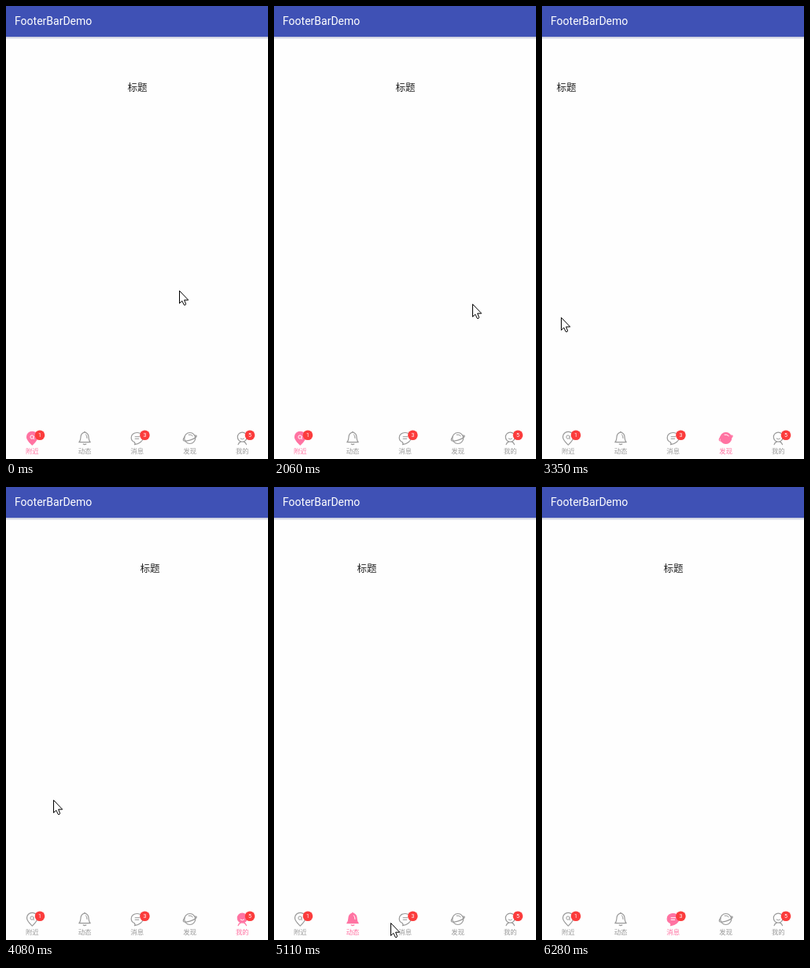
Animation of 333 by 575 pixels, one loop 6.74 s. Source, as an HTML page:

```html
<!DOCTYPE html>
<html lang="zh-CN">
<head>
<meta charset="utf-8">
<title>FooterBarDemo</title>
<style>
html, body { margin: 0; width: 100%; height: 100%; overflow: hidden; background: #fefefe; }
svg { display: block; width: 333px; height: 575px; }
text { font-family: "Noto Sans CJK SC", "Noto Sans CJK", sans-serif; text-anchor: middle; }
.bar { font: 14px Roboto, sans-serif; fill: #fff; text-anchor: start; }
.title { font-size: 12.5px; fill: #222; }
.tab { color: #999; }
.tab.on { color: #ff73a2; }
.tab text { font-size: 8.4px; fill: currentColor; }
.body, .line, .mark { fill: none; stroke: currentColor; stroke-width: 1.2; stroke-linecap: round; stroke-linejoin: round; }
.mark { stroke-width: 1; }
.on .body { fill: currentColor; }
.on .mark { stroke: #fff; }
.badge circle { fill: #fb3c3c; }
.badge text { font: 7px Roboto, sans-serif; fill: #fff; }
</style>
</head>
<body>
<svg viewBox="0 0 333 575">
  <defs>
    <linearGradient id="shade" x2="0" y2="1">
      <stop offset="0" stop-color="#303a80" stop-opacity=".3"/>
      <stop offset="1" stop-color="#303a80" stop-opacity="0"/>
    </linearGradient>
  </defs>
  <rect width="333" height="575" fill="#fefefe"/>
  <rect y="39" width="333" height="3.5" fill="url(#shade)"/>
  <rect width="333" height="39" fill="#3f51b5"/>
  <text class="bar" x="11" y="24">FooterBarDemo</text>

  <g id="pages">
    <text class="title" x="167" y="108">标题</text>
    <text class="title" x="500" y="108">标题</text>
  </g>

  <!-- icons are drawn around the centre of each tab -->
  <g class="tab" transform="translate(33.3 548.5)">
    <path class="body" d="M0 8.6C-3 5.6-6.8 2.2-6.8-1.6A6.8 6.6 0 0 1 6.8-1.6C6.8 2.2 3 5.6 0 8.6Z"/>
    <circle class="mark" cx="-.2" cy="-1.4" r="2.2"/>
    <path class="mark" d="M1.4.2L2.4 1.2"/>
    <text y="19">附近</text>
  </g>
  <g class="tab" transform="translate(100 548.5)">
    <path class="body" d="M-7.2 5.2C-4.8 3.2-5.3 0-4.9-2.4C-4.5-5-2.6-6.8 0-7.6C2.6-6.8 4.5-5 4.9-2.4C5.3 0 4.8 3.2 7.2 5.2Z"/>
    <path class="line" d="M-1.8 7.6Q0 8.8 1.8 7.6M0-8.2V-7.6"/>
    <path class="mark" d="M1.5-4.6Q3-3.2 3 0"/>
    <text y="19">动态</text>
  </g>
  <g class="tab" transform="translate(166.7 548.5)">
    <path class="body" d="M-3.6 5C-6 4-7.5 2-7.5-.6C-7.5-4.4-4.2-7 0-7S7.5-4.4 7.5-.6C7.5 3.6 3 7.2-3.2 8.2C-2.4 7.2-2.6 6-3.6 5Z"/>
    <path class="mark" d="M-2.6-1.8H3M-2.6.8H2"/>
    <text y="19">消息</text>
  </g>
  <g class="tab" transform="translate(233.7 548.5)">
    <circle class="body" r="7"/>
    <path class="line" d="M-6.6-1.6C-8.2.4-8.8 2.4-8 3.2C-5 4.4 5 2 8.3-2C8.8-3.2 8-3.7 6.4-3.2"/>
    <path class="mark" d="M-1.6-4.4Q1.4-5 3.6-2.8"/>
    <text y="19">发现</text>
  </g>
  <g class="tab" transform="translate(300.3 548.5)">
    <circle class="body" cy="-1.4" r="6"/>
    <path class="line" d="M-5.2 8.2Q-4.6 5.6-2 4.6M5.2 8.2Q4.6 5.6 2 4.6"/>
    <path class="mark" d="M-2.2.6Q0 2.6 2.2.6"/>
    <text y="19">我的</text>
  </g>

  <g class="badge" transform="translate(43 544.7)"><circle r="6.3"/><text y="2.4">1</text></g>
  <g class="badge" transform="translate(176.4 544.7)"><circle r="6.3"/><text y="2.4">3</text></g>
  <g class="badge" transform="translate(310 544.7)"><circle r="6.3"/><text y="2.4">5</text></g>

  <path id="cursor" d="M.5.5V16.5L3.8 13.3L6.3 18.5H8L8.6 17.2L6.6 12.2H11.7Z" fill="#fff" stroke="#000"/>
</svg>
<script>
const LOOP = 6740, WIDTH = 333;
const STEP = 72;          // usual time between two refreshes
const PULL = 0.375;       // finger speed in px per ms

// The screen only refreshes during these bursts, in even steps
const bursts = [[0], [520, 580], [950, 1250], [2060, 2740, 3350, 4080, 4720],
  [4870, 5110, 5280], [5500], [5780, 6280]];

// Page changes: released at, new tab, px dragged before, settling time
const moves = [
  { at: 0, tab: 0, drag: 0, settle: 1 },
  { at: 2430, tab: 1, drag: 137, settle: 600 },
  { at: 2869, tab: 2, drag: 61, settle: 500 },
  { at: 3317, tab: 3, drag: 19, settle: 370 },
  { at: 3817, tab: 4, drag: 48, settle: 600 },
  { at: 4929, tab: 1, drag: 0, settle: 400 },
  { at: 5738, tab: 2, drag: 0, settle: 200 }
];

// Cursor way points: time, x, y
const path = [
  [0, 220, 361], [580, 205, 369], [1250, 254, 377], [2060, 252, 378],
  [2400, 102, 397], [2740, 125, 398], [3350, 24, 395], [3720, 110, 396],
  [4080, 60, 397], [4720, 70, 547], [5110, 148, 553], [5280, 157, 553],
  [5500, 167, 553], [6280, 174, 576]
];

const split = (a, b) => {
  const n = Math.max(1, Math.round((b - a) / STEP));
  return Array.from({ length: n }, (_, i) => a + (b - a) * (i + 1) / n);
};
const ticks = bursts.flatMap(([first, ...rest]) =>
  [first, ...rest.flatMap((b, i) => split(i ? rest[i - 1] : first, b))]);
const tickAt = t => ticks.findLastIndex(k => k <= t + 0.01);

const pages = document.getElementById("pages");
const cursor = document.getElementById("cursor");
const tabs = document.querySelectorAll(".tab");

function scrollAt(t) {
  const i = moves.findLastIndex(m => m.at - m.drag / PULL <= t);
  const { at, tab, drag, settle } = moves[i];
  const from = i ? moves[i - 1].tab * WIDTH : 0;
  if (t < at) return from + drag + (t - at) * PULL;
  const left = 1 - Math.min(1, (t - at) / settle);
  const to = tab * WIDTH;
  return to + (from + drag - to) * left ** 5;
}

// Way points are joined evenly over the refreshes, so pauses hold still
function cursorAt(tick) {
  const i = path.findLastIndex(p => tickAt(p[0]) <= tick);
  const a = path[i], b = path[i + 1] || a;
  const start = tickAt(a[0]), span = tickAt(b[0]) - start || 1;
  const mix = k => Math.round(a[k] + (b[k] - a[k]) * (tick - start) / span);
  return `${mix(1)} ${mix(2)}`;
}

function draw(now) {
  const tick = tickAt(now % LOOP), t = ticks[tick];
  const shift = Math.round(scrollAt(t)) % WIDTH;
  pages.setAttribute("transform", `translate(${-shift} 0)`);
  cursor.setAttribute("transform", `translate(${cursorAt(tick)})`);
  const { tab } = moves.findLast(m => m.at <= t);
  tabs.forEach((el, i) => el.classList.toggle("on", i === tab));
}

let begin;
function frame(now) {
  begin ??= now;
  draw(now - begin);
  requestAnimationFrame(frame);
}
draw(0);
requestAnimationFrame(frame);
</script>
</body>
</html>
```
